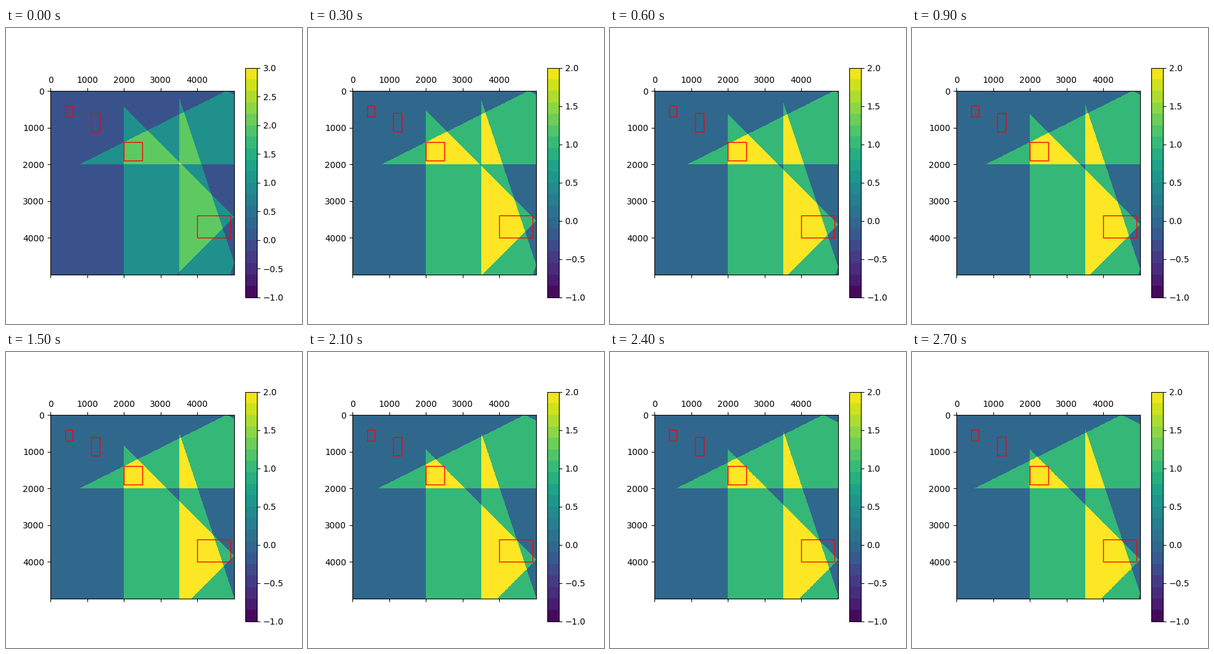
A matplotlib script that plays this animation: 480 by 480 pixels, repeating every 3000 ms.

```python
import numpy as np
import matplotlib.pyplot as plt
from matplotlib.animation import FuncAnimation
from matplotlib.cm import ScalarMappable
from matplotlib.colors import ListedColormap
from matplotlib.patches import Rectangle

SIZE, CELL = 5000, 4
FRAMES, FRAME_MS = 10, 300
BANDS = 20

axis = np.arange(SIZE // CELL) * CELL + CELL / 2
x, y = axis[None, :], axis[:, None]


def beam(along, across, start, half, reach):
    """Triangle with its base on across = 0 and its peak at across = reach."""
    limit = reach * (1 - abs(along - start - half) / half)
    return (across >= 0) & (across <= limit)


def coverage(step):
    # The tall beam sinks two steps out of three, then settles.
    tall = 430 + 102 * min(step - step // 3, 5)
    # The wide beam wavers, then drifts left.
    wide = np.interp(step, [1, 2, 4, 5, 6, 9], [790, 890, 690, 790, 790, 490])
    # The narrow beam sinks, rests and rises again.
    narrow = np.interp(step, [0, 5, 7, 9], [170, 470, 470, 360])
    return (beam(y, x - 2000, tall, 3000, 3000).astype(float)
            + beam(x, 2000 - y, wide, 4000, 2000)
            + beam(y, x - 3500, narrow, 4500, 1500))


def add_zone(left, top, width, height):
    ax.add_patch(Rectangle((left, top), width, height, fill=False,
                           edgecolor="red", linewidth=1))


fig = plt.figure(figsize=(4.8, 4.8), dpi=100)
ax = fig.add_axes((0.15, 0.09, 0.775, 0.775))
viridis = plt.get_cmap("viridis")
edge = SIZE - 0.5
image = ax.matshow(coverage(0), cmap=viridis,
                   extent=(-0.5, edge, edge, -0.5),
                   interpolation="nearest", vmin=-1, vmax=3)

banded = ListedColormap(viridis((np.arange(BANDS) + 0.5) / BANDS))
fig.colorbar(ScalarMappable(norm=image.norm, cmap=banded), ax=ax)

add_zone(400, 400, 200, 300)
add_zone(1100, 600, 250, 500)
add_zone(2000, 1400, 500, 500)
add_zone(4000, 3400, 900, 600)


def update(step):
    counts = coverage(step)
    image.set_data(counts)
    image.set_clim(-1, counts.max())
    return [image]


anim = FuncAnimation(fig, update, frames=FRAMES, interval=FRAME_MS,
                     repeat=True, repeat_delay=0, blit=False)
plt.show()
```
